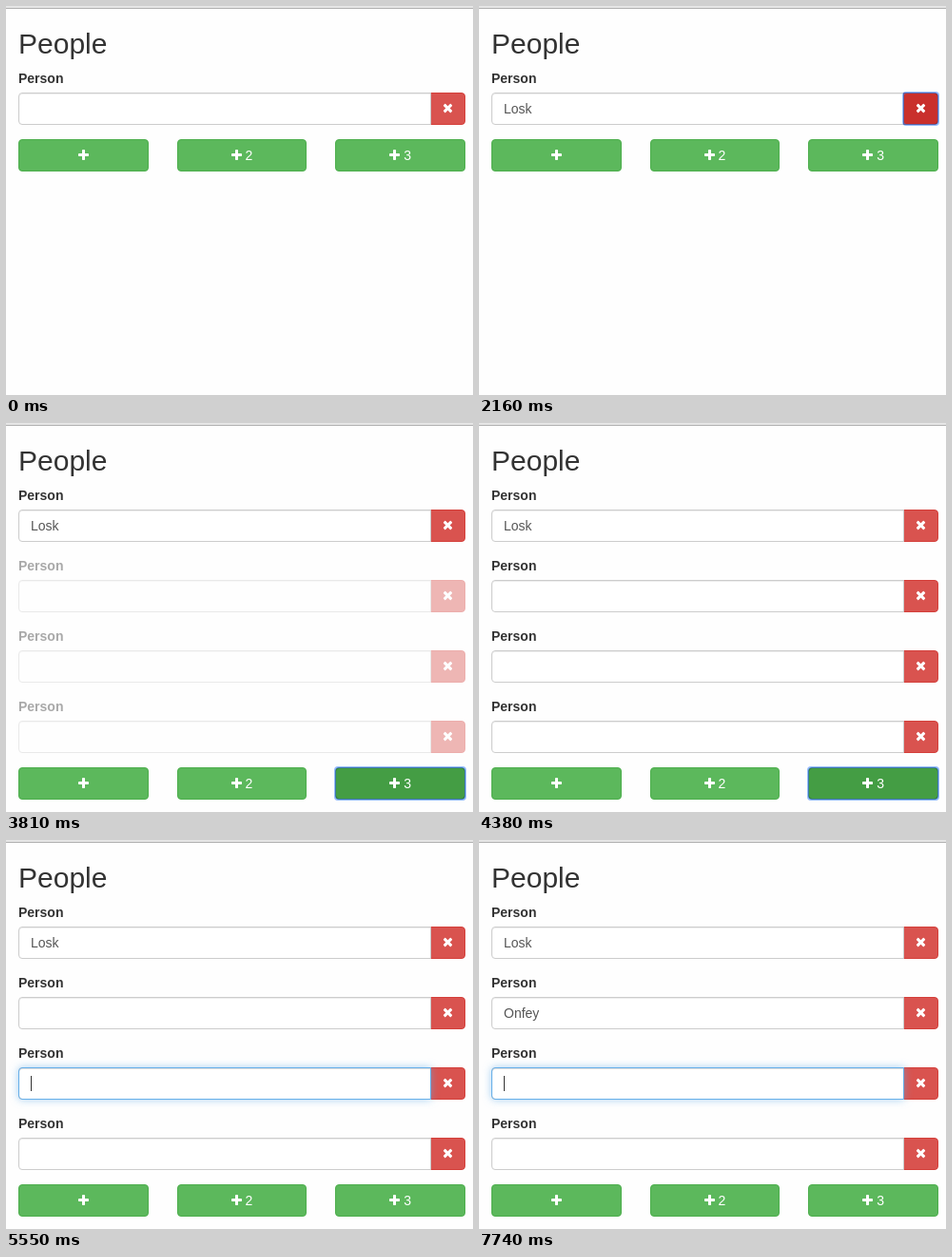
An HTML page for the animation above (8 s loop, 491 px wide and 409 px high).

```html
<!DOCTYPE html>
<html lang="en">
<head>
<meta charset="utf-8">
<title>People</title>
<style>
* { box-sizing: border-box; }
html, body { margin: 0; width: 100%; height: 100%; overflow: hidden; }
body {
  position: relative;
  background: #fefefe;
  color: #333;
  font: 14px/20px "Liberation Sans", Arial, sans-serif;
}
.bar {
  position: absolute; left: 0; right: 0; top: 0; height: 3px;
  background: #e6e6e6; border-bottom: 1px solid #b0b0b0;
}
h2 {
  position: absolute; left: 13px; top: 23px; margin: 0;
  font-size: 30px; line-height: 33px; font-weight: 500;
}
.row { position: absolute; left: 13px; width: 470px; height: 59px; }
.row b { position: absolute; left: 0; top: 0; }
.input {
  position: absolute; left: 0; top: 25px; z-index: 2;
  width: 434px; height: 34px; padding: 6px 12px;
  background: #fff; color: #555;
  border: 1px solid #ccc; border-radius: 4px 0 0 4px;
  box-shadow: inset 0 1px 1px rgba(0, 0, 0, .075);
  white-space: pre;
}
.glow {
  position: absolute; inset: -1px; opacity: 0;
  border: 1px solid #66afe9; border-radius: inherit;
  box-shadow: inset 0 1px 1px rgba(0, 0, 0, .075), 0 0 8px rgba(102, 175, 233, .6);
}
.caret { position: absolute; top: 8px; width: 1px; height: 16px; background: #333; }
.btn {
  position: absolute; height: 34px; padding: 6px 0;
  border: 1px solid; border-radius: 4px;
  color: #fff; text-align: center;
}
.btn svg { width: 11px; height: 11px; vertical-align: 0; fill: #fff; overflow: visible; }
.remove {
  left: 433px; top: 25px; width: 37px; border-radius: 0 4px 4px 0;
  background: #d9534f; border-color: #d43f3a;
}
.remove svg { transform: rotate(45deg); }
.remove.on { z-index: 3; background: #c9302c; border-color: #761c19; }
.add { width: 136.67px; background: #5cb85c; border-color: #4cae4c; }
.add.on { background: #449d44; border-color: #255625; }
.add.down { background: #398439; box-shadow: inset 0 3px 5px rgba(0, 0, 0, .125); }
.btn.on::after {
  content: ""; position: absolute; inset: -2px;
  border: 2px solid rgba(77, 144, 254, .6); border-radius: 4px;
}
</style>
</head>
<body>
<div class="bar"></div>
<h2>People</h2>
<script>
const LOOP = 8000;
const ROW_TOP = 66, ROW_STEP = 74;
const PRESS = 3390, RELEASE = 3480;
const FADE_IN = 3590, FADE_TIME = 800;
const GLOW_TIME = 120, GLOW_LEAD = 30;
const BLINK = [720, 990];

// Keyboard focus over time: i = input, x = remove button, b = add button
const focus = [
  [270, "i0"], [1920, "x0"], [2550, "b0"], [2670, "b1"], [3060, "b2"],
  [4440, "b1"], [4650, "b0"], [4800, "x3"], [5100, "i3"], [5280, "x2"],
  [5430, "i2"], [5790, "x1"], [6090, "i1"], [7260, "x1"], [7650, "i2"]
];

const typing = [
  { text: "Losk", keys: [990, 1140, 1230, 1440] },
  { text: "Onfey", keys: [6540, 6720, 6780, 6900, 7050] }
];

const plus = '<svg viewBox="0 0 11 11"><rect y="4" width="11" height="3" rx=".75"/>' +
  '<rect x="4" width="3" height="11" rx=".75"/></svg>';

function add(parent, tag, cls, html = "") {
  const el = document.createElement(tag);
  el.className = cls;
  el.innerHTML = html;
  return parent.appendChild(el);
}

const rows = [0, 1, 2, 3].map(i => {
  const el = add(document.body, "div", "row");
  el.style.top = ROW_TOP + ROW_STEP * i + "px";
  add(el, "b", "", "Person");
  const input = add(el, "div", "input");
  return {
    el,
    glow: add(input, "div", "glow"),
    text: add(input, "span", ""),
    caret: add(input, "div", "caret"),
    remove: add(el, "div", "btn remove", plus)
  };
});

const adders = ["", " 2", " 3"].map((label, i) => {
  const el = add(document.body, "div", "btn add", plus + label);
  el.style.left = 13 + i * 500 / 3 + "px";
  return el;
});

const clamp = x => Math.min(1, Math.max(0, x));
const smooth = x => x * x * (3 - 2 * x);

// Height of the input glow: rises on focus, falls on blur
function glowAt(id, t) {
  let level = 0;
  focus.forEach(([start, target], k) => {
    if (target !== id || t < start) return;
    const end = k + 1 < focus.length ? focus[k + 1][0] : LOOP;
    const part = from => smooth(clamp((t - from + GLOW_LEAD) / GLOW_TIME));
    level = t < end ? part(start) : 1 - part(end);
  });
  return level;
}

// Slow start and long settle for the new rows
const appear = x => 1 - Math.pow(1 - Math.pow(x, 1.25), 2.4);

function draw(t) {
  const past = focus.filter(([start]) => start <= t);
  const current = past.length ? past[past.length - 1][1] : "";
  const count = t < RELEASE ? 1 : 4;
  const caretOn = t < BLINK[0] || t >= BLINK[1];

  rows.forEach((row, i) => {
    row.el.style.display = i < count ? "" : "none";
    row.el.style.opacity = i ? appear(clamp((t - FADE_IN) / FADE_TIME)) : 1;
    row.glow.style.opacity = glowAt("i" + i, t);
    row.remove.classList.toggle("on", current === "x" + i);

    const typed = typing[i];
    row.text.textContent = typed
      ? typed.text.slice(0, typed.keys.filter(k => k <= t).length) : "";
    const active = current === "i" + i && caretOn;
    row.caret.style.display = active ? "" : "none";
    if (active) {
      const width = row.text.getBoundingClientRect().width;
      row.caret.style.left = 12 + Math.round(width) + "px";
    }
  });

  adders.forEach((el, i) => {
    el.style.top = ROW_TOP + ROW_STEP * count + "px";
    el.classList.toggle("on", current === "b" + i);
    el.classList.toggle("down", i === 2 && t >= PRESS && t < RELEASE);
  });
}

const began = performance.now();
function tick() {
  draw((performance.now() - began) % LOOP);
  requestAnimationFrame(tick);
}
tick();
</script>
</body>
</html>
```
